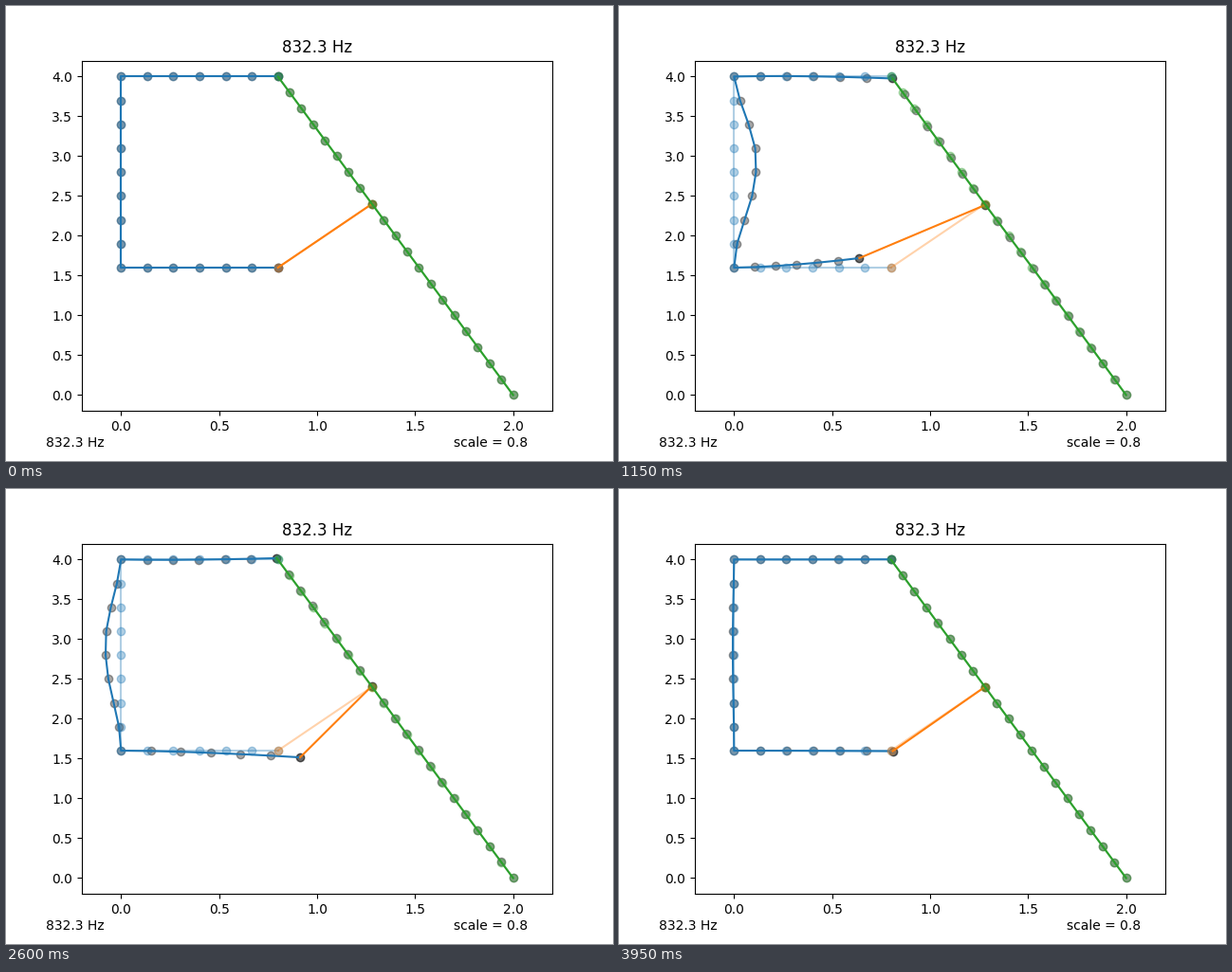
A matplotlib script for the animation above (4000 ms loop, 640x480 px).

```python
import numpy as np
import matplotlib.pyplot as plt
from matplotlib.animation import FuncAnimation

FRAMES, STEP = 80, 50
PX = np.array([496 / 2.4, 369.6 / 4.4])  # pixels per data unit
FADE = 0.35


def line(a, b, n):
    return np.linspace(a, b, n + 1)


# Rest shape
arm = line((0.8, 1.6), (0, 1.6), 6)
wall = line((0, 1.6), (0, 4), 8)
roof = line((0, 4), (0.8, 4), 6)
frame = np.vstack([arm, wall[1:], roof[1:]])
beam = line((0.8, 4), (2, 0), 20)
strut = np.array([arm[0], beam[8]])

# Mode shape in pixels at full deflection, y up
s = np.linspace(1, 0, 7)
arm_d = np.column_stack([-39.2 * s, 11.8 * s**1.6])
wall_x = [0, 3.7, 13, 22.4, 27.2, 26.2, 18, 7.4, 0]
wall_d = np.column_stack([wall_x, np.zeros(9)])
roof_d = np.column_stack([np.linspace(0, 2, 7),
                          [0, 0.5, 0.6, 0.2, -0.4, -1.3, -2.4]])
k = np.arange(21)
knots = [0, 4, 8, 12, 16, 20]
beam_d = np.column_stack([np.interp(k, knots, [2, 1.5, 0.5, 1.5, 1.1, 0]),
                          np.interp(k, knots, [-2.4, -2.2, -1.2, -1.4, -0.9, 0])])
frame_d = np.vstack([arm_d, wall_d[1:], roof_d[1:]])
strut_d = np.array([arm_d[0], beam_d[8]])

parts = [(frame, frame_d / PX, "C0"),
         (strut, strut_d / PX, "C1"),
         (beam, beam_d / PX, "C2")]

fig, ax = plt.subplots(figsize=(6.4, 4.8), dpi=100)
ax.set(xlim=(-0.2, 2.2), ylim=(-0.2, 4.2))
ax.set_title("832.3 Hz")
fig.text(42.5 / 640, 15 / 480, "832.3 Hz")
fig.text(472.5 / 640, 15 / 480, "scale = 0.8")

moving = []
for rest, shift, color in parts:
    ax.plot(*rest.T, "o-", color=color, alpha=FADE)
    dots = ax.scatter(*rest.T, color="k", alpha=FADE)
    curve, = ax.plot(*rest.T, color=color)
    moving.append((rest, shift, dots, curve))


def triangle(i):
    """Triangle wave: 0, 1, 0, -1, 0 over one loop."""
    p = (i / FRAMES + 0.25) % 1
    return 1 - 4 * abs(p - 0.5)


def update(i):
    amp = triangle(i)
    for rest, shift, dots, curve in moving:
        pts = rest + amp * shift
        dots.set_offsets(pts)
        curve.set_data(*pts.T)
    return [a for m in moving for a in m[2:]]


anim = FuncAnimation(fig, update, frames=FRAMES, interval=STEP,
                     repeat=True, repeat_delay=0)
plt.show()
```
